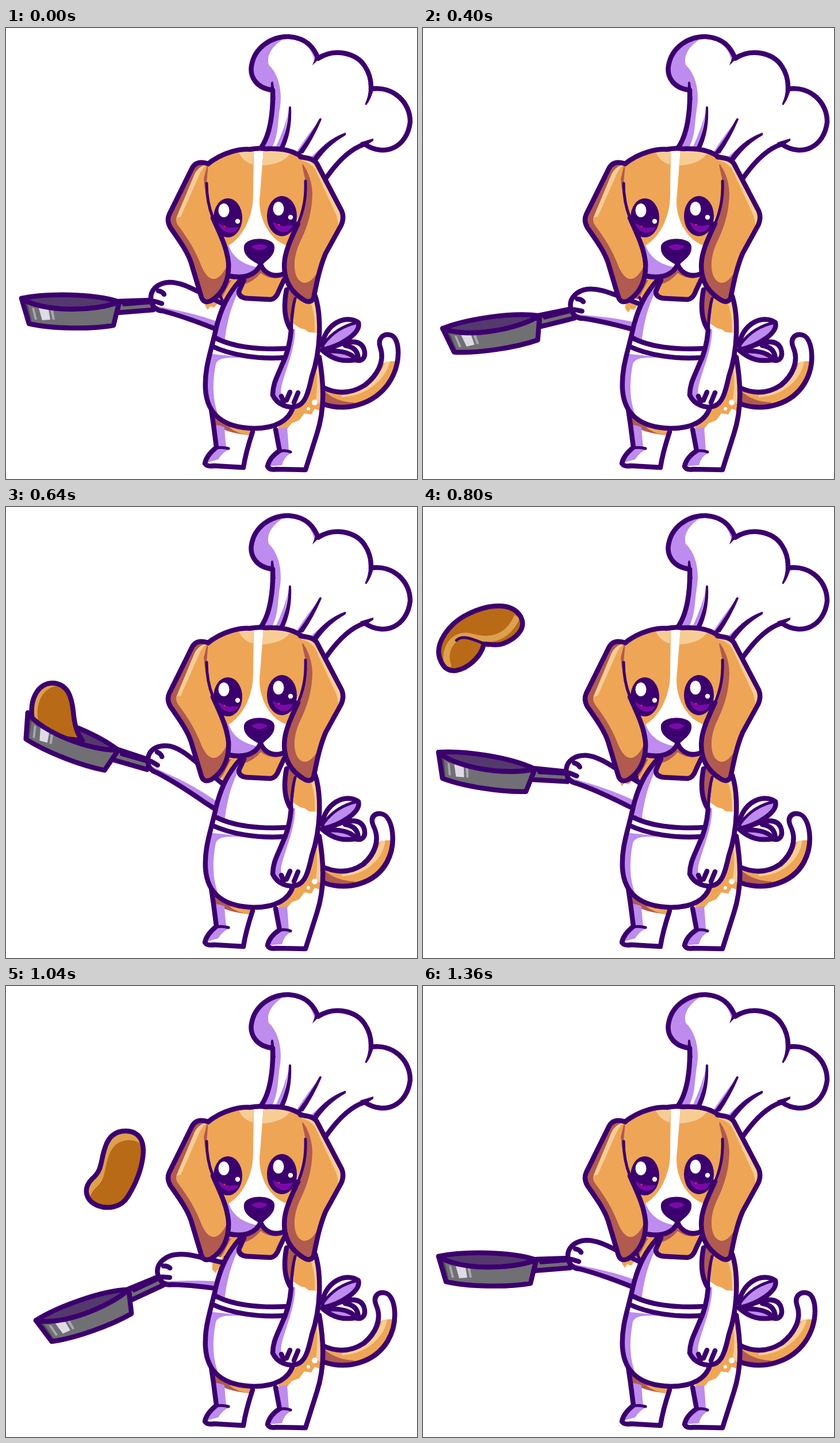
Animation of 715x784 px, one loop 1440 ms. Source, as an HTML page:

```html
<!DOCTYPE html>
<html lang="en">
<head>
<meta charset="utf-8">
<title>Chef dog flipping a pancake</title>
<style>
  html, body { margin: 0; height: 100%; overflow: hidden; background: #fff; }
  svg { display: block; width: 100vw; height: 100vh; }
  .line { fill: none; stroke: #3c006e; stroke-width: 8.5; stroke-linecap: round; stroke-linejoin: round; }
  .thin { stroke-width: 5; }
  .ink { fill: #3c006e; }
  .white { fill: #fff; }
  .lilac { fill: #bd8cee; }
  .tan { fill: #efa556; }
  .light { fill: #f7cd95; }
  .brown { fill: #b05a50; }
  .iris { fill: #7a0aa8; }
  .steel { fill: #706f74; }
  .well { fill: #54396e; }
  .cake { fill: #b96a17; }
  .rim { fill: #dda04c; }
</style>
</head>
<body>
<svg viewBox="0 0 715 784">
  <defs>
    <path id="tailShape" d="M550 653C590 668 640 655 666 617C688 584 686 540 670 534C656 530 646 540 651 555C660 580 645 605 624 621C600 636 575 637 550 624Z"/>
    <path id="leftEar" d="M352 236C338 231 328 234 323 245L284 324Q279 335 286 347C305 374 316 390 322 408L340 468Q344 480 357 474C376 462 389 440 387 408C384 380 372 358 360 330C352 310 349 292 349 270Z"/>
    <path id="rightEar" d="M512 224C522 226 535 226 541 236L584 318Q589 330 583 343L556 392C545 418 540 446 535 470Q529 480 517 472C492 456 481 432 485 402C490 368 524 334 521 266Z"/>
    <path id="apronShape" d="M408 438C386 462 374 488 366 520C356 566 345 590 347 628C350 676 384 695 431 696C474 696 499 680 500 640L496 500L486 438Z"/>
    <path id="armShape" d="M398 490L340 461C322 452 304 442 284 442C266 443 253 453 252 467C252 482 259 491 273 492C304 500 334 511 364 523L400 536Z"/>
    <path id="panWall" d="M27 470C62 494 154 494 197 476L187 517C146 524 80 523 40 514Z"/>
    <path id="bean" d="M208 252C232 252 242 270 238 298C234 328 222 350 212 366C200 386 176 388 160 382C138 373 133 352 150 335C168 320 164 305 172 282C178 262 190 252 208 252Z"/>
    <path id="scoop" d="M46 370C40 335 55 306 82 306C108 308 114 330 117 355C119 380 124 394 133 406L60 398Z"/>
    <path id="fold" d="M50 215C50 180 95 162 130 163C170 164 208 180 209 210C209 235 180 240 160 237C145 235 138 225 130 222C115 240 85 246 66 240C52 235 50 225 50 215Z"/>
    <clipPath id="tailClip"><use href="#tailShape"/></clipPath>
    <clipPath id="leftClip"><use href="#leftEar"/></clipPath>
    <clipPath id="rightClip"><use href="#rightEar"/></clipPath>
    <clipPath id="apronClip"><use href="#apronShape"/></clipPath>
    <clipPath id="armClip"><use href="#armShape"/></clipPath>
    <clipPath id="wallClip"><use href="#panWall"/></clipPath>
    <clipPath id="beanClip"><use href="#bean"/></clipPath>
    <clipPath id="scoopClip"><use href="#scoop"/></clipPath>
  </defs>

  <g id="tail">
    <g clip-path="url(#tailClip)">
      <path class="tan" d="M540 600H640L656 583Q670 576 690 582V680H540Z"/>
      <path class="brown" d="M540 600L553 630Q572 650 606 651Q590 664 540 660Z"/>
      <path class="light" d="M584 637C622 632 652 604 660 580L668 580C660 612 626 640 584 642Z"/>
    </g>
    <use href="#tailShape" class="line"/>
  </g>

  <g id="bow">
    <path class="white" d="M550 552C554 516 590 496 613 512C618 530 584 552 560 556C590 545 614 540 622 556C628 572 620 581 608 577C590 580 570 578 550 562Z"/>
    <path class="lilac" d="M552 550C572 528 592 518 613 512C618 530 584 552 552 558ZM552 562C574 560 592 562 608 577C590 582 570 578 552 562Z"/>
    <path class="line thin" d="M553 549C570 526 592 516 612 512"/>
    <path class="line" d="M550 552C554 516 590 496 613 512C618 530 584 552 550 560C570 578 588 580 608 577C604 566 588 561 560 561M566 556C590 545 614 540 622 556C628 572 620 581 608 577M590 552C606 554 612 563 613 574"/>
  </g>

  <g id="legs">
    <path class="white" d="M355 650L365 730L345 757Q348 763 360 762L413 764L430 697H468L475 735L454 760Q456 768 468 768L521 768L541 705C556 660 554 620 546 570Z"/>
    <path class="brown" d="M360 672L429 698L425 708Q380 704 362 688Z"/>
    <path class="tan" d="M388 694L431 698L426 708Q402 706 388 694ZM472 696L500 660L520 650L545 572C553 610 553 640 548 666L537 662L531 672L519 670L510 682L497 687L488 698Z"/>
    <path class="light" d="M540 592L546 578C553 612 552 636 548 656L539 646Q543 622 540 592Z"/>
    <path class="lilac" d="M362 690Q371 690 380 694Q381 712 383 728L390 732Q378 736 369 750L347 756L366 730ZM470 697L489 694Q491 716 492 735L498 738Q484 744 480 760L455 762L476 736Z"/>
    <g class="white"><circle cx="537" cy="651" r="5"/><circle cx="526" cy="662" r="3"/></g>
    <path class="line" d="M356 656L361 690L366 729C356 737 348 746 346 757Q350 763 362 761L413 764C417 738 423 720 429 702M469 698L476 735C465 742 457 752 455 762Q458 769 470 767L521 768L541 705C555 662 553 618 545 572"/>
    <path class="line thin" d="M366 730Q376 728 387 731M476 736Q486 733 495 737"/>
  </g>

  <path class="tan" d="M385 425H500L540 470L536 535L485 500H400L370 500Z"/>
  <path class="brown" d="M384 440L392 438L374 472L368 470Z"/>

  <g class="panPart">
    <path class="line steel" style="fill:#706f74" d="M197 475L256 473V490L193 495Z"/>
    <path class="ink" d="M198 475L254 473L254 480L204 484Z"/>
    <path class="well" d="M27 470C70 461 150 461 197 476C154 494 62 494 27 470Z"/>
    <path class="line" d="M27 470C70 461 150 461 197 476C154 494 62 494 27 470Z"/>
  </g>

  <g id="flyer">
    <g id="folded">
      <use href="#fold" class="cake"/>
      <path fill="none" stroke="#dda04c" stroke-width="11" d="M57 229C60 197 92 180 114 198C138 222 168 235 204 207"/>
      <path class="line thin" d="M91 194C106 190 118 206 136 228"/>
      <use href="#fold" class="line"/>
    </g>
    <g id="curved">
      <use href="#bean" class="rim"/>
      <g clip-path="url(#beanClip)"><use href="#bean" class="cake" x="6" y="16"/></g>
      <use href="#bean" class="line"/>
    </g>
    <g id="rising">
      <use href="#scoop" class="rim"/>
      <g clip-path="url(#scoopClip)"><use href="#scoop" class="cake" x="10" y="5"/></g>
      <use href="#scoop" class="line"/>
    </g>
  </g>

  <g class="panPart">
    <use href="#panWall" class="steel"/>
    <g clip-path="url(#wallClip)">
      <path fill="#4d4c50" d="M26 470L38 480L47 520H34Z"/>
      <path fill="#aaa7b0" d="M45 486L49 487L54 507H50Z"/>
      <path fill="#dfdbe6" d="M57 487L74 489L77 507L63 508Z"/>
      <path fill="#aaa7b0" d="M77 489L82 489L85 507L81 507Z"/>
    </g>
    <use href="#panWall" class="line"/>
  </g>

  <g id="arm">
    <use href="#armShape" class="white"/>
    <g clip-path="url(#armClip)">
      <path class="lilac" d="M250 479C275 490 320 489 400 523V545L250 495Z"/>
      <path class="tan" d="M352 460L400 450V500L372 474L362 486L355 484L351 490L346 482Z"/>
    </g>
    <use href="#armShape" class="line"/>
    <path class="line" d="M265 457Q272 458 275 463M258 475Q265 477 271 479"/>
    <path class="line thin" d="M373 466L378 478"/>
  </g>

  <g id="apron">
    <use href="#apronShape" class="white"/>
    <g clip-path="url(#apronClip)">
      <path class="lilac" d="M400 430L411 445C394 476 384 508 380 548L350 540ZM340 565L432 574C394 573 370 570 365 584C357 625 360 660 378 692L340 690Z"/>
    </g>
    <path class="tan" d="M414 432L405 457Q405 469 420 470L460 472Q470 471 475 456L487 432Z"/>
    <path class="brown" d="M402 438L443 414L482 432Q462 440 443 426Q430 442 412 446Z"/>
    <path class="line" d="M414 438L405 458Q405 469 420 470L460 472Q470 471 475 456L484 437M408 438C386 462 374 488 366 520C356 566 345 590 347 628C350 676 384 695 431 696C470 696 492 682 499 660M363 538C392 554 438 560 490 557M358 553C392 569 438 576 484 573"/>
  </g>

  <g id="restingArm">
    <path class="white" d="M490 470H540C549 500 545 558 537 590C531 616 527 638 519 650C508 667 472 660 463 638C462 616 478 594 483 576C492 552 496 532 496 515Z"/>
    <path class="brown" d="M488 450L506 470L497 528Q482 504 484 474Z"/>
    <path class="tan" d="M504 470H538Q546 500 544 530L527 529L520 524L512 522L500 514Z"/>
    <path class="light" d="M529 474L540 472Q546 500 544 530L537 530Q539 500 529 474Z"/>
    <path class="lilac" d="M496 526L503 523C503 560 486 594 479 624Q477 636 481 650Q468 648 463 636C464 612 490 578 496 526Z"/>
    <path class="line" d="M488 455C482 486 486 510 496 525C494 552 488 570 480 586C472 606 464 618 464 638C472 656 492 661 503 658C520 656 526 634 532 606C548 560 549 500 538 466M479 640L483 650M494 633L488 647M508 634L501 651"/>
    <path class="line thin" d="M503 470Q496 496 497 524"/>
  </g>

  <g id="hat">
    <path class="white" d="M443 209C460 186 465 145 464 108C435 105 424 84 427 66C432 34 462 14 492 15C522 17 536 34 543 53C570 35 608 42 624 66Q636 84 636 106C674 100 704 130 702 164C697 204 660 224 622 201C598 210 574 236 556 262Z"/>
    <path class="lilac" d="M490 15C466 27 452 46 457 64C474 80 482 110 476 142C472 170 474 186 462 210L443 209C460 186 465 145 464 108C435 105 424 84 427 66C432 34 462 14 490 15ZM510 18Q534 28 543 53L537 58Q531 32 510 18ZM493 140Q486 172 468 210H480ZM546 160Q524 186 504 218H516ZM588 185Q554 200 526 229H543Q564 202 588 185ZM636 194L618 203L628 197Z"/>
    <path class="line" d="M443 209C460 186 465 145 464 108C435 105 424 84 427 66C432 34 462 14 492 15C522 17 536 34 543 53C570 35 608 42 624 66Q636 84 635 106C674 100 704 130 703 164C698 206 660 226 624 202C598 210 574 236 556 262"/>
    <path class="ink" d="M461 95Q463 91 465 95L469 125H460ZM492 138Q494 134 496 138Q498 180 483 211H474Q491 178 492 138ZM545 158Q548 155 549 159Q535 192 517 218H506Q528 190 545 158ZM590 182Q593 184 590 187Q560 204 541 232H530Q552 196 590 182ZM639 192V196L622 207L616 199ZM548 50L533 65L539 49ZM640 104Q636 122 627 134Q624 134 625 131Q631 118 631 104Z"/>
  </g>

  <g id="head">
    <path class="white" d="M349 240C380 212 410 210 440 210C480 209 510 216 525 240L521 300L488 425Q464 437 443 413Q426 437 388 431Z"/>
    <path class="lilac" d="M378 372L386 374C392 394 406 410 438 416Q420 437 388 431Z"/>
    <path class="tan" d="M349 240C380 212 410 210 431 210L430 290C430 328 412 365 384 380L349 310ZM448 210C480 209 510 216 525 240L521 300L488 378C458 368 436 328 442 288Z"/>
    <path class="light" d="M403 211L431 210L429 237Q410 232 403 211ZM448 210L497 213Q488 236 446 239Z"/>
    <path class="line" d="M349 238C378 214 410 210 424 211Q440 208 452 210C480 209 500 212 520 228M388 431C418 437 436 427 443 411C450 428 468 436 488 425"/>
    <path class="ink" d="M414 380C416 362 466 362 467 380C468 397 454 402 444 414C430 405 412 398 414 380Z"/>
    <path class="iris" d="M427 380Q441 372 455 380Q449 386 441 386Q433 386 427 380Z"/>
    <g class="ink"><ellipse cx="386" cy="330" rx="25" ry="34"/><ellipse cx="480" cy="327" rx="26" ry="35"/></g>
    <path class="iris" d="M369 339Q386 349 405 346Q400 357 387 356Q373 353 369 339ZM464 337Q480 346 499 342Q494 356 481 355Q468 352 464 337Z"/>
    <path class="ink" d="M374 341Q386 333 397 345Q386 351 374 341ZM469 338Q482 330 492 342Q480 348 469 338Z"/>
    <g class="white">
      <ellipse cx="379" cy="317" rx="9.5" ry="12"/><circle cx="403" cy="336" r="4.2"/>
      <ellipse cx="474" cy="314" rx="9.5" ry="12"/><circle cx="495" cy="329" r="4.2"/>
    </g>
    <g fill="#d33a35"><circle cx="380" cy="345" r="1.6"/><circle cx="475" cy="342" r="1.6"/></g>

    <use href="#leftEar" class="tan"/>
    <g clip-path="url(#leftClip)">
      <path class="light" d="M330 228L352 236Q342 242 336 256L304 328L296 330Z"/>
      <path class="brown" d="M320 232L346 238Q334 242 328 254L297 328Q294 336 300 344C318 368 330 388 340 414C350 438 366 448 383 416L394 440L350 490L270 340ZM344 262L350 238L358 270V316Q346 294 344 262Z"/>
    </g>
    <path class="line" d="M352 236C338 231 328 234 323 245L284 324Q279 335 286 347C305 374 316 390 322 408L340 468Q344 480 357 474C376 462 389 440 387 408C384 380 372 358 360 330"/>
    <path class="line thin" d="M360 330C352 310 349 292 349 270"/>

    <use href="#rightEar" class="tan"/>
    <g clip-path="url(#rightClip)">
      <path class="light" d="M514 222L545 230L594 330L580 352Q578 338 575 326L538 246Q530 234 514 230Z"/>
      <path class="brown" d="M516 236Q532 258 533 288C532 330 520 354 509 378C496 410 502 440 518 443Q535 444 550 408L540 490H500L475 440L484 380Z"/>
    </g>
    <path class="line" d="M512 224C522 226 535 226 541 236L584 318Q589 330 583 343L556 392C545 418 540 446 535 470Q529 480 517 472C492 456 481 432 485 402C488 382 498 362 508 340"/>
    <path class="line thin" d="M508 340C518 316 522 296 521 266"/>
  </g>
</svg>
<script>
  const STEP = 80, COUNT = 18;
  const swing = [0, -2.5, -5, -7.5, -8, -6, 2, 9.5, 13, 9.5, 5, 1, -7, -13, -10, -6.4, -3, 0];
  const SHOULDER = "400 432", GRIP = "252 482";

  // Pancake pose per step: shape, centre x, centre y, rotation
  const flight = {
    8: ["rising", 0, 0, 0],
    9: ["curved", 72, 276, -40],
    10: ["folded", 96, 222, -28],
    11: ["folded", 129, 203, 0],
    12: ["folded", 165, 245, 28],
    13: ["curved", 189, 318, 0],
    14: ["curved", 168, 450, 28]
  };
  const centre = { rising: [0, 0], curved: [189, 318], folded: [129, 203] };

  const byId = id => document.getElementById(id);
  const pans = document.querySelectorAll(".panPart");

  function draw(step) {
    const arm = `rotate(${swing[step]} ${SHOULDER})`;
    byId("arm").setAttribute("transform", arm);
    for (const pan of pans)
      pan.setAttribute("transform", `${arm} rotate(${swing[step] * 0.57} ${GRIP})`);

    const lean = 0.07 * (1 - Math.cos(2 * Math.PI * step / COUNT));
    byId("tail").setAttribute("transform", `matrix(1 0 ${lean} 1 ${-640 * lean} 0)`);

    const [shape, x, y, turn] = flight[step] || [];
    for (const id in centre) byId(id).style.display = id === shape ? "" : "none";
    if (shape) {
      const [cx, cy] = centre[shape];
      byId("flyer").setAttribute("transform", `translate(${x} ${y}) rotate(${turn}) translate(${-cx} ${-cy})`);
    }
  }

  const start = performance.now();
  function tick() {
    draw(Math.floor((performance.now() - start) / STEP) % COUNT);
    requestAnimationFrame(tick);
  }
  tick();
</script>
</body>
</html>
```
